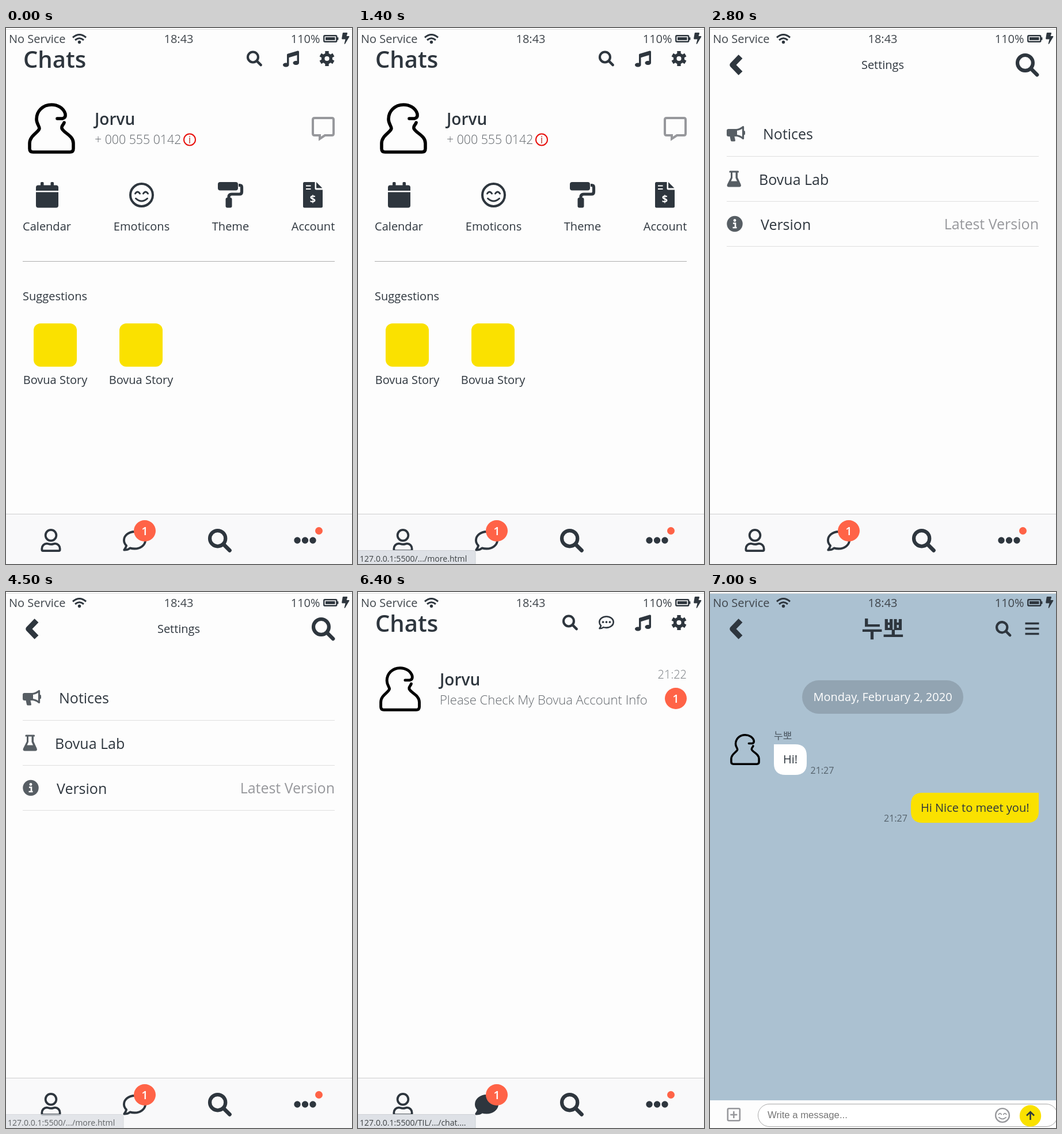
Animation of 601 by 929 pixels, one loop 8.9 s. Source, as an HTML page:

```html
<!DOCTYPE html>
<html lang="en">
<head>
<meta charset="utf-8">
<title>Messenger screens</title>
<style>
  html, body { margin: 0; width: 100%; height: 100%; overflow: hidden; background: #fdfdfd; }
  svg { display: block; width: 601px; height: 929px; }
  text { font-family: "Open Sans", "Noto Sans CJK KR", "Noto Sans CJK", sans-serif; white-space: pre; }
</style>
</head>
<body>
<svg id="stage" viewBox="0 0 601 929" xmlns="http://www.w3.org/2000/svg"></svg>
<script>
const INK = '#2e363e', YELLOW = '#fae100', TOMATO = '#ff6347', GRAY = '#97989c';
const LOOP = 8900;

const text = (x, y, label, size = 20, { fill = INK, weight = 400, anchor = 'start', extra = '' } = {}) =>
  `<text x="${x}" y="${y}" font-size="${size}" font-weight="${weight}" fill="${fill}" text-anchor="${anchor}" ${extra}>${label}</text>`;
const rect = (x, y, w, h, r, fill) =>
  `<rect x="${x}" y="${y}" width="${w}" height="${h}" rx="${r}" fill="${fill}"/>`;
const line = (d, width, color = INK, attrs = '') =>
  `<path d="${d}" fill="none" stroke="${color}" stroke-width="${width}" ${attrs}/>`;
const shape = (d, fill = INK) => `<path d="${d}" fill="${fill}"/>`;
const dot = (x, y, r, fill = INK) => `<circle cx="${x}" cy="${y}" r="${r}" fill="${fill}"/>`;
const ring = (x, y, r, width, color = INK) =>
  `<circle cx="${x}" cy="${y}" r="${r}" fill="none" stroke="${color}" stroke-width="${width}"/>`;
const icons = (...parts) => `<g class="icon">${parts.join('')}</g>`;
const page = (id, ...parts) => `<g id="${id}" class="page">${parts.join('')}</g>`;
// Content that sits higher while the icons are still missing.
const lift = (dx, dy, ...parts) => `<g class="lift" data-shift="${dx} ${dy}">${parts.join('')}</g>`;

const BUBBLE = 'M256 56C128 56 24 138 24 240c0 44 19 85 52 118-9 36-32 72-48 94 60 0 108-24 128-42 30 10 64 14 100 14 128 0 232-82 232-184S384 56 256 56z';
const bubble = fill => `<path d="${BUBBLE}" fill="${fill}" stroke="${INK}" stroke-width="48" stroke-linejoin="round"/>`;

// Glyphs on a 512 unit square.
const glyphs = {
  search: ring(208, 208, 170, 78) + line('M335 335L468 468', 84, INK, 'stroke-linecap="round"'),
  music: shape('M512 32c0-22-21-37-42-30.500L150 96c-13 4-22 16.500-22 30.500V388c-10-2-21-4-32-4-53 0-96 29-96 64s43 64 96 64 96-29 96-64V214l256-75v185c-10-2-21-4-32-4-53 0-96 29-96 64s43 64 96 64 96-29 96-64z'),
  cog: ring(256, 256, 130, 105) + [0, 60, 120].map(a =>
    line('M256 8V130M256 382V504', 120, INK, `transform="rotate(${a} 256 256)" stroke-linejoin="round"`)).join(''),
  user: ring(224, 144, 120, 48) + line('M24 464v-25.600C24 377 73 328 134 328c22 0 43 16 90 16s67-16 90-16c61 0 110 49 110 110.400V464q0 24-24 24H48q-24 0-24-24z', 48),
  comment: bubble('none'),
  commentFull: bubble(INK),
  commentDots: bubble('none') + [144, 256, 368].map(x => dot(x, 240, 34)).join('')
};
const glyph = (name, x, y, size) =>
  `<g transform="translate(${x} ${y}) scale(${size / 512})">${glyphs[name]}</g>`;

const smile = (x, y, scale, color) => `<g transform="translate(${x} ${y}) scale(${scale})">` +
  ring(0, 0, 19.5, 4, color) +
  line('M-11-2.500q4-6 8 0M3-2.500q4-6 8 0M-10 6q10 9 20 0', 3, color, 'stroke-linecap="round"') + '</g>';

const avatar = (x, y, sx, sy) => `<g transform="translate(${x} ${y}) scale(${sx} ${sy})">` +
  line('M51 27H60Q66 26 65 19C62 8 51 3 41 3C26 3 15 14 15 28C15 36 20 40 20 44C19 51 3 56 3 70V79Q3 85 9 85H73Q79 85 79 79V70C79 56 62 52 59 44C58 39 62 38 63 34',
    5.6, '#000', 'stroke-linecap="round" stroke-linejoin="round"') + '</g>';

const badge = (x, y) => `<ellipse cx="${x}" cy="${y}" rx="19" ry="18.500" fill="${TOMATO}"/>` +
  text(x, y + 7, '1', 20, { fill: '#fff', weight: 600, anchor: 'middle' });
const backArrow = line('M53 49.500L39 64L53 78.500', 9.5, INK, 'stroke-linejoin="round"');

const statusBar = [
  shape('M0 2.500H601', 'none'),
  text(5, 26, 'No Service', 20, { fill: '#3f454b' }),
  text(300, 26, '18:43', 20, { fill: '#3f454b', anchor: 'middle' }),
  text(545.5, 26, '110%', 20, { fill: '#3f454b', anchor: 'end' }),
  icons(
    line('M116 16.500Q127.500 6.500 139 16.500M120 21Q127.500 14.500 135 21', 3),
    dot(127.5, 24.5, 2.7),
    `<rect x="552.300" y="13.300" width="22" height="10.400" rx="1.500" fill="none" stroke="${INK}" stroke-width="2.400"/>`,
    rect(555, 16, 16.5, 5, 0, INK), rect(575, 16, 2.4, 5, 1, INK),
    shape('M586 8h6q1.500 0 1 1.500l-1.500 4.500h4q1.500 0 .7 1.500L589 27.500q-1.500 1-1.300-.5l1.800-7.500h-5q-1.500 0-1.300-1.500l1.500-9q.2-1 1.300-1z'))
].join('');

const nav = id => rect(0, 842, 601, 87, 0, '#f9f9fa') + line('M0 842.500H601', 1, '#cfcfcf') +
  icons(
    glyph('user', 60.5, 868, 40),
    glyph(id === 'list' ? 'commentFull' : 'comment', 203, 868.5, 41),
    glyph('search', 351, 868, 41),
    [506, 519.5, 533].map(x => dot(x, 888, 5.7)).join('')) +
  badge(241, 871.5) + dot(543.5, 871.5, 6.5, TOMATO);

const chatsTitle = text(30, 69, 'Chats', 40, { weight: 600 });
const headerIcons = glyph('music', 481, 39.5, 28) + glyph('cog', 544, 39.5, 27);

const menu = [['Calendar', 71], ['Emoticons', 235.5], ['Theme', 390], ['Account', 533.5]];
const more = page('more',
  chatsTitle,
  icons(glyph('search', 418, 39.5, 27), headerIcons),
  avatar(38, 130, 1, 1),
  text(154, 168, 'Jorvu', 28, { weight: 600 }),
  text(154, 201, '+ 000 555 0142', 21.3, { weight: 300, fill: '#62676c' }),
  icons(
    ring(319, 193.5, 10, 2, '#e8100c'),
    text(319, 200, 'i', 18, { fill: '#c0392b', anchor: 'middle' }),
    line('M536 156h30q3 0 3 3v24q0 3-3 3h-12l-9 6v-6h-9q-3 0-3-3v-24q0-3 3-3z', 4, GRAY),
    rect(60, 267, 5.5, 9, 1.5, INK), rect(77.5, 267, 5.5, 9, 1.5, INK),
    shape('M56 272.500h31q4 0 4 4v5.500H52v-5.500q0-4 4-4zM52 284.500h39v23q0 4-4 4H56q-4 0-4-4z'),
    smile(235.5, 289.5, 1, INK),
    rect(368, 267, 35, 14.5, 4, INK),
    line('M404 272.500h2q3.500 0 3.500 3.500v8q0 4-4 4H392q-5 0-5 5v2', 5.2),
    rect(381.5, 294, 11, 17.5, 3, INK),
    shape('M518 267h18.500v11q0 2.500 2.500 2.500h11v28.500q0 2.500-2.500 2.500h-29q-2.500 0-2.500-2.500v-39.500q0-2.500 2-2.500zM539 267l10.500 10.500H539z'),
    line('M521 273.500h8.500M521 279h8.500', 2.2, '#fff'),
    text(533, 303, '$', 18, { weight: 700, fill: '#fff', anchor: 'middle' })),
  lift(0, -45,
    menu.map(([label, x]) => text(x, 351, label, 20, { anchor: 'middle' })).join(''),
    line('M29 404.500H571', 1.2, '#adadad'),
    text(29, 472, 'Suggestions'),
    [85.5, 234.5].map(x => rect(x - 37.5, 512, 75, 75, 12, YELLOW) +
      text(x, 617, 'Bovua Story', 20, { anchor: 'middle' })).join('')),
  nav('more'));

const SOFT = '#575e64';
const settings = page('settings',
  icons(backArrow, glyph('search', 531, 44, 40.5),
    `<g transform="translate(29 169)">` +
      shape('M3 6H18V19H13.500L15 26Q15 27.500 13 27.500H9Q7.500 27.500 7 26L5.500 19H3Q0 19 0 16V9Q0 6 3 6z', SOFT) +
      line('M17 7.500Q23 7 28.500 2.500V22.500Q23 18 17 17.500', 3.2, SOFT, 'stroke-linejoin="round"') +
      rect(28, 9, 4, 7.5, 2, SOFT) + '</g>',
    shape('M34.500 247.500H49Q50 247.500 50 249V250.500H48V259L53.500 271Q55 275.500 51 275.500H32.500Q28.500 275.500 30 271L36 259V250.500H33.500V249Q33.500 247.500 34.500 247.500zM39 250.500V260L36.500 265.500H47L44.500 260V250.500z', SOFT),
    dot(43, 339.5, 13.7, SOFT), dot(43, 333.5, 2.4, '#fff'),
    line('M40 338.500h4v7.500M39.500 346h7', 2.6, '#fff')),
  lift(0, -20, text(300, 71, 'Settings', 20, { anchor: 'middle' })),
  [['Notices', 92, 193], ['Bovua Lab', 85, 272], ['Version', 88, 350]].map(([label, x, y]) =>
    lift(54 - x, -40, text(x, y, label, 25))).join(''),
  lift(0, -40,
    text(571, 349, 'Latest Version', 25, { anchor: 'end', fill: GRAY }),
    line('M29 222.500H571M29 300.500H571M29 378.500H571', 1.2, '#dfdfdf')),
  nav('settings'));

const list = page('list',
  chatsTitle,
  icons(glyph('search', 355, 39.5, 27), glyph('commentDots', 418, 39.5, 27), headerIcons),
  avatar(37, 129, .88, .885),
  text(142, 162, 'Jorvu', 28, { weight: 600 }),
  text(142, 195, 'Please Check My Bovua Account Info', 22, { weight: 300, fill: '#62676c' }),
  text(571, 150, '21:22', 20, { weight: 300, fill: '#777c80', anchor: 'end' }),
  badge(552, 184.5),
  nav('list'));

const TIME = { fill: '#56636d' };
const room = page('room',
  rect(0, 3, 601, 878, 0, '#abc1d1'),
  icons(backArrow, glyph('search', 496, 50, 27.5), line('M547.500 54.500h24M547.500 63.500h24M547.500 72.500h24', 3.6)),
  text(300, 78, '누뽀', 40, { weight: 600, anchor: 'middle' }),
  rect(160, 153, 280, 58, 29, '#92a4b2'),
  text(300, 189, 'Monday, February 2, 2020', 20, { fill: '#fff', anchor: 'middle' }),
  avatar(35, 246, .634, .614),
  text(111, 255, '누뽀', 17, { weight: 300, fill: '#4a5660' }),
  shape('M111 264H148Q168 264 168 284V297Q168 317 148 317H131Q111 317 111 297z', '#fff'),
  text(127, 297, 'Hi!'),
  text(174.5, 315, '21:27', 16, TIME),
  shape('M369 348H571V380Q571 400 551 400H369Q349 400 349 380V368Q349 348 369 348z', YELLOW),
  text(366, 381, 'Hi Nice to meet you!'),
  text(302, 398, '21:27', 16, TIME),
  rect(0, 881, 601, 48, 0, '#fdfdfd'),
  `<rect x="83.500" y="887.500" width="520" height="39" rx="19.500" fill="#fff" stroke="#a9a9a9"/>`,
  text(100, 912, 'Write a message...', 16.7, { fill: '#757575', extra: 'style="font-family:\'Liberation Sans\',Arial,sans-serif"' }),
  dot(556.5, 908, 18.7, YELLOW),
  icons(
    `<rect x="30.800" y="895.300" width="21" height="21" rx="2" fill="none" stroke="${GRAY}" stroke-width="2.600"/>`,
    line('M41.300 900v12M35.300 906h12', 2.6, GRAY),
    smile(508, 907, .61, GRAY),
    line('M556.500 915V901M550 907.500L556.500 901L563 907.500', 2.6)));

const tip = `<g id="tip"><path d="M-1 905.500H200Q204 905.500 204 909.500V930H-1z" fill="#dee1e6" stroke="#cfd2d6"/>` +
  text(3, 924.5, '', 14.1, { fill: '#3c4043', extra: 'id="tipText"' }) + '</g>';

const stage = document.getElementById('stage');
stage.innerHTML = rect(0, 0, 601, 929, 0, '#fdfdfd') + more + settings + list + room +
  rect(0, 0, 601, 2, 0, '#fff') + line('M0 2.500H601', 1, '#dcdcdc') + statusBar + tip;

const HOST = '127.0.0.1:5500/';
const MORE = HOST + '.../more.html', SETTINGS = HOST + '.../settings.h...';
const CHATS = HOST + '.../chats.html', ROOM = HOST + 'TIL/.../chat....';

// [start ms, page, icons loaded, link preview, preview opacity]
const steps = [
  [0, 'more', true, '', 0],
  [1100, 'more', true, MORE, 1],
  [1300, 'more', false, MORE, 1],
  [1400, 'more', true, MORE, 1],
  [1500, 'more', true, MORE, .7],
  [1600, 'more', true, MORE, .35],
  [1700, 'more', true, '', 0],
  [2300, 'more', true, SETTINGS, 1],
  [2400, 'settings', false, SETTINGS, 1],
  [2500, 'settings', true, SETTINGS, 1],
  [2700, 'settings', true, SETTINGS, .5],
  [2800, 'settings', true, '', 0],
  [4500, 'settings', true, MORE, .8],
  [4600, 'settings', true, MORE, 1],
  [4700, 'more', false, MORE, 1],
  [4800, 'more', true, MORE, 1],
  [4900, 'more', true, MORE, .7],
  [5000, 'more', true, MORE, .35],
  [5100, 'more', true, '', 0],
  [5600, 'more', true, CHATS, 1],
  [5700, 'list', true, CHATS, 1],
  [5800, 'list', true, '', 0],
  [6400, 'list', true, ROOM, 1],
  [6600, 'room', false, ROOM, 1],
  [6700, 'room', true, ROOM, 1],
  [6800, 'room', true, ROOM, .7],
  [6900, 'room', true, ROOM, .35],
  [7000, 'room', true, '', 0]
];

const all = name => [...stage.querySelectorAll(name)];
const pages = all('.page'), iconGroups = all('.icon'), lifted = all('.lift');
const tipBox = document.getElementById('tip'), tipText = document.getElementById('tipText');

function draw(ms) {
  const [, current, loaded, link, opacity] = steps.filter(step => step[0] <= ms).pop();
  pages.forEach(p => p.setAttribute('display', p.id === current ? 'inline' : 'none'));
  iconGroups.forEach(g => g.setAttribute('display', loaded ? 'inline' : 'none'));
  lifted.forEach(g => g.setAttribute('transform', loaded ? '' : `translate(${g.dataset.shift})`));
  tipBox.setAttribute('opacity', opacity);
  tipText.textContent = link;
}

const start = performance.now();
function tick() {
  draw((performance.now() - start) % LOOP);
  requestAnimationFrame(tick);
}
tick();
</script>
</body>
</html>
```
